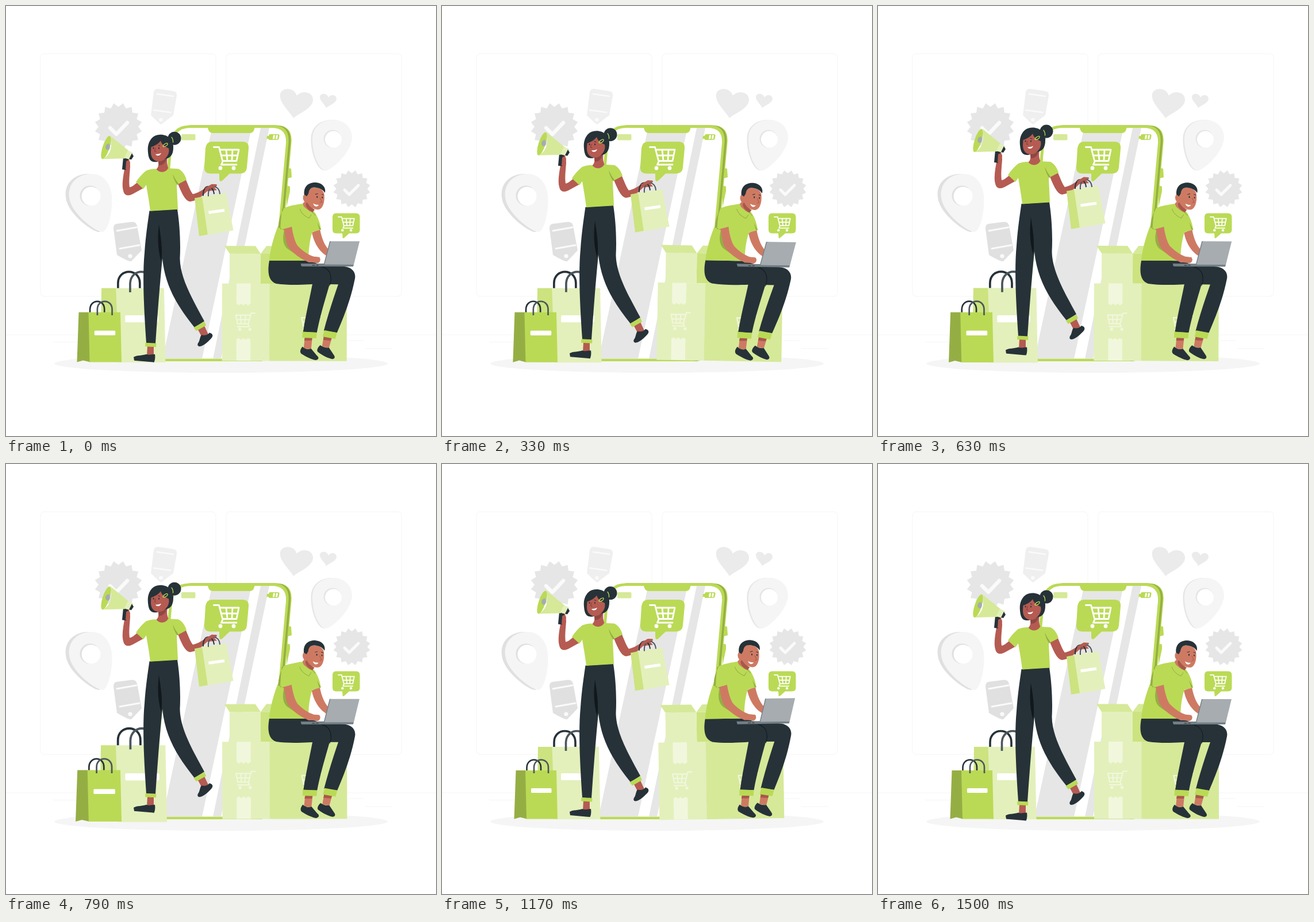
An HTML page for the animation above (1540 ms loop, 748 px wide and 748 px high).

```html
<!DOCTYPE html>
<html lang="en">
<head>
<meta charset="utf-8">
<title>Shopping online</title>
<style>
  html, body { margin: 0; width: 100%; height: 100%; overflow: hidden; background: #fff; }
  svg { display: block; width: 100vw; height: 100vh; }
  .lime { fill: #bada55; } .shade { fill: #cce37f; } .mid { fill: #d6e999; } .pale { fill: #e3f0bb; } .olive { fill: #95ae44; }
  .navy { fill: #263238; } .tan { fill: #ce7a63; } .brown { fill: #b55b52; } .white { fill: #fff; }
  .g1 { fill: #e0e0e0; } .g2 { fill: #e6e6e6; } .g3 { fill: #ebebeb; } .g4 { fill: #f5f5f5; }
  .line { fill: none; stroke-linecap: round; stroke-linejoin: round; }
  .butt { fill: none; }
  .dark { stroke: #263238; } .slate { stroke: #4b565c; } .light { stroke: #fafafa; }
</style>
</head>
<body>
<svg viewBox="0 0 748 748">
  <defs>
    <g id="cart">
      <path class="line" stroke-width="2.800" d="M1.500 2H10.500L17 27 14.500 32.500H41M12.500 6.500H45L41 26H17M23 7L25 25M34 7L33 25M15 16.500H43"/>
      <g stroke="none"><circle cx="13" cy="38.500" r="3.400"/><circle cx="36" cy="38.500" r="3.400"/></g>
    </g>
    <path id="pinLeft" d="M147 292C170 291 184 310 184.500 335C185 362 177 392 168 393C158 394 113 362 110 333C107 308 125 293 147 292Z"/>
    <path id="pinRight" d="M567 198C588 197 602 211 602 229C601 254 568 285 557 286C545 287 533 258 533 234C532 212 547 199 567 198Z"/>
    <path id="phoneBody" d="M318 207.500H465Q494 207.500 491.500 238L460 588Q456 618 436 618H276Q250 618 252 590L284 242Q288 208 318 207.500Z"/>
  </defs>

  <!-- room -->
  <g fill="none" stroke="#f5f5f5">
    <rect x="60" y="83" width="305" height="422" rx="7"/>
    <rect x="383" y="83" width="305" height="422" rx="7"/>
    <path d="M0 572H748M82 584.500H128M594 582H622M624 596H672"/>
  </g>

  <!-- floating icons -->
  <path class="g2" id="badgeLeft"/>
  <path class="line light" stroke-width="6.500" d="M181 212L192 223 211 203"/>
  <path class="g2" id="badgeRight"/>
  <path class="line light" stroke-width="5" d="M589 320L597 328 613 312"/>

  <path fill="#efefef" d="M264 144L291 148Q298 149 297 156L291 190 270 206Q268 206 252 190L257 150Q258 144 264 144Z"/>
  <path class="line light" stroke-width="2.500" d="M263 153L291 157M257 181L286 185"/>
  <circle cx="269.500" cy="198" r="3.300" fill="#fafafa"/>
  <path class="g1" d="M192 379L219 375.500Q226 375 228 382L236 425 218 444Q215 446 193 433L187 387Q187 380 192 379Z"/>
  <path class="line light" stroke-width="3" d="M193 391L227 385M198 422L232 416"/>
  <circle cx="216" cy="435" r="3.600" fill="#fafafa"/>

  <use href="#pinLeft" class="g1" x="-6"/><use href="#pinLeft" class="g4"/>
  <circle class="g1" cx="146" cy="330" r="17.500"/><circle class="white" cx="148" cy="331" r="16.500"/>
  <use href="#pinRight" class="g2" x="-2.500"/><use href="#pinRight" class="g4"/>
  <circle class="g2" cx="568" cy="231" r="15.500"/><circle class="white" cx="569.500" cy="232" r="14.500"/>
  <path class="g3" d="M500 195C495 185 474 168 477 153C480 142 500 140 506 156C514 146 533 149 534 162C535 178 510 186 500 195Z"/>
  <path class="g3" d="M557 177.500C555 171 545 165 546 157C548 151 558 151 561 159C565 153 574 154 575 161C575 169 563 172 557 177.500Z"/>

  <ellipse class="g4" cx="374" cy="622" rx="290" ry="16"/>

  <!-- phone -->
  <path class="lime" d="M488 281L496 283 497 298 489 300ZM488 312L494 314 494 322 488 350Z"/>
  <use href="#phoneBody" class="lime" x="5"/><use href="#phoneBody" class="olive" x="3.500"/><use href="#phoneBody" class="lime"/>
  <path class="white" d="M319 212H462Q489 212 487 239L456 586Q453 613.500 435 613.500H278Q255 613 257 590L289 243Q292 213 319 212Z"/>
  <path class="g2" d="M358.500 212H427L341 613.500H272.500ZM443 212H458L374 613.500H360Z"/>
  <path class="lime" d="M350 208H433C432 217 430 221 424 221H360C353 221 352 216 350 208Z"/>
  <rect class="mid" x="305" y="223" width="24.500" height="10.500" rx="2"/>
  <path class="lime" d="M454 226h3q0-3 3-3h13q3 0 2.500 3l-1 5q-.5 2-3 2h-13q-2 0-2-2h-3z"/>
  <path class="white" d="M465 224.500h3l-1 7h-3zM470 224.500h3l-1 7h-3z"/>
  <path class="lime" d="M358 236H412Q423 236 422 248L419 281Q418 291.500 407 291.500H389L376 304Q371 307 371 300L371 291.500H355Q344 291 345 280L347 247Q349 236 358 236Z"/>
  <use href="#cart" transform="translate(360 243.500)" fill="#fff" stroke="#fff"/>

  <!-- shopping bags -->
  <g id="bags">
    <path class="shade" d="M167 492H192L202 617H165Z"/>
    <path class="pale" d="M191.500 492H273L275.500 618H196Z"/>
    <rect class="white" x="207" y="538" width="56" height="12" rx="2"/>
    <path class="butt dark" stroke-width="3.600" d="M195 492V484C195 458 232 458 232 484V492"/>
    <path class="butt slate" stroke-width="3.600" d="M215.500 499V484C217 458 252 458 252 484V499"/>
    <path class="olive" d="M128.500 533H146L148 617.500 136 614.500 125.500 617.500Z"/>
    <path class="lime" d="M145 533H199L201 617.500H147Z"/>
    <rect class="white" x="155" y="564" width="35.500" height="8" rx="1.500"/>
    <path class="butt dark" stroke-width="2.600" d="M147.500 533V528C148 510 172 510 172 528V533"/>
    <path class="butt slate" stroke-width="2.600" d="M160 538V528C160 510 185 510 185 528V538"/>
  </g>

  <!-- woman -->
  <g id="woman">
    <path class="brown" d="M246 592H257V610H245ZM334 564L345 557 352 572 342 579Z"/>
    <path class="navy" d="M222 611.500C227 608 238 609 244 606.500C250 609 255 606 259 606.500C260 612 259 618 257.500 620.500L223 617.500ZM354 569C361 571 361 576 355 581C349 587 342 593 336 593C332 592 333 588 335.500 585C338 579 338 573 341 573Q349 575 354 569Z"/>
    <path class="navy" d="M251 357L298 354C302 380 304 410 302.500 440C303 470 318 500 345 549L328 560C300 525 277 490 272 440C268 480 264 530 260 588L244 587C240 530 237 470 241 430C243 400 247 375 249.500 357Z"/>
    <path d="M266 381C264 400 263 420 270 446C273 425 269 400 266 381Z" fill="#10181c"/>
    <path class="lime" d="M242.500 586.500L261.500 587.500 261 594 242 593ZM326.500 560L345 549.500 348 556.500 331 566Z"/>

    <path class="brown" d="M228 308C222 313 218 316 215 316C213.500 305 215 295 216 280L214 265 207 268 207 280C204 295 201 312 204 322C206 332 214 331 220 328L240 317Z"/>
    <path class="brown" d="M264 268L282 261C279 270 280 278 283 284C280 293 267 293 261 285C266 281 266 275 264 268Z"/>
    <path d="M265 271Q275 270 279 264L278 270Q274 278 266 278Z" fill="#8f4741"/>
    <path class="brown" d="M299 310L313 303C318 315 322 325 325 328C335 326 342 320 350 316L358 311 366 311C368 313 366 315 362 316L367 321 350 323C340 333 330 340 320 341C311 340 304 322 299 310Z"/>
    <path class="lime" d="M244 287C252 284 258 284 261 284C267 292 278 291 282 283L300 284C308 288 312 296 314 303L297 312 299 354.500 251 357.500C249 340 246 325 244 312L239 319 226 307Q234 295 244 287Z"/>
    <path class="olive" d="M290 293Q292 304 298 312L300 310Q294 302 290 293Z"/>

    <path class="navy" d="M204 264L213 267 209 286 202 285Z"/>
    <ellipse class="lime" cx="174" cy="247" rx="6" ry="21" transform="rotate(18 174 247)"/>
    <path class="mid" d="M182 227Q185 241 181 253Q177 263 168 267L207 266 214 253Z"/>
    <path d="M179 240Q173 241 173 247Q174 252 179 251Q183 245 179 240Z" fill="#a6acaf"/>
    <path class="pale" d="M212 252L221 256 216 268 206 265Z"/>
    <path class="navy" d="M219 257L222 262 218 268 214 267Z"/>
    <path class="brown" d="M209 271Q214 267 216 273L215 284 208 285Z"/>

    <circle class="navy" cx="293" cy="231" r="11.500"/>
    <path class="navy" d="M247 255C245 238 254 224.500 268 224.500C282 224 292 234 291 247C291 258 287 264 280 266L262 272C252 273 248 268 247 255Z"/>
    <path class="brown" d="M252.500 246C259 244 266 240 269 235C271 242 277 246 283 248C285 256 281 262 278 265C274 270 269 271 264 271C257 270 252 265 252 255Z"/>
    <path class="line" stroke="#bada55" stroke-width="1.300" d="M273 245C273 242 280 238 281 240C282 243 275 247 273 245ZM288 229Q291 233 290.500 238"/>
    <path class="line dark" d="M255 244L257 243M265 243L268 244"/>
    <path class="line" stroke="#7e3b37" d="M260 248L258.500 253.500 261 254"/>
    <ellipse class="navy" cx="256.500" cy="248" rx="1" ry="1.600"/><ellipse class="navy" cx="266" cy="248" rx="1" ry="1.600"/>
    <path class="white" d="M260 258.500Q265 259 270 256.500Q268 261.500 263.500 261Q261 260.500 260 258.500Z"/>

    <path class="butt dark" stroke-width="2" d="M343 331C342 310 360 310 362 328"/>
    <path class="shade" d="M328 335L343 332 353 398 336 401Z"/>
    <path class="pale" d="M341 332L383 326 395.500 391 351 399Z"/>
    <path class="butt" stroke="#fff" stroke-width="5" d="M352.500 360L380 356"/>
    <path class="butt slate" stroke-width="2" d="M352 332C350 310 371 310 372 328"/>
    <path class="brown" d="M345 318L358 310.500 366 311Q368 313 362 315L354 319Z"/>
  </g>

  <!-- man on boxes -->
  <g id="man">
    <path class="shade" d="M443 431H490V483H443Z"/>
    <path class="mid" d="M443 431L453 417.500H480V431Z"/>
    <path class="pale" d="M389 431H443V483H389ZM376 483H459V617.500H376Z"/>
    <path class="mid" d="M380 417.500H434L443 431H389ZM458.500 483H593V617.500H458.500Z"/>
    <path fill="#f1f7dd" d="M401 483H425.500V518L421 521 417 518 413 521 409 518 405 521 401 518ZM401 617V580L405 578 409 581 413 578 417 581 421 578 425.500 580V617Z"/>
    <g fill="#f1f7dd" stroke="#f1f7dd">
      <use href="#cart" transform="translate(434.500 533) scale(-.77 .77)"/>
      <use href="#cart" transform="translate(549 537) scale(-.77 .77)"/>
    </g>

    <path class="tan" d="M520 577H533L531 597 518 596ZM553 575L567 577 562 595 550 592Z"/>
    <path d="M520 577H533L532 582 519 582ZM553 575L567 577 565 582 552 581Z" fill="#a8584a"/>
    <path class="navy" d="M516 592.500C512 597 511 602 514 605C522 610 532 615 539 616C545 615 545 611 541 608L531 596C526 598 520 597 516 592.500ZM547 590C542 594 540 600 543 602C551 608 561 613 568 614C573 613 573 610 570 606L562 594C556 595 551 593 547 590Z"/>
    <path class="navy" d="M530 447L590 453C603 455 609 464 607 474C600 510 588 540 576 568L553 565C560 538 569 510 578 484L558 484Z"/>
    <path class="navy" d="M458 443C455 460 455 478 470 483C490 486 515 485 533 484C528 510 521 540 517 567L541 568C546 540 557 505 564 480C567 462 560 456 530 443Z"/>
    <path class="line" stroke="#11191d" d="M550 454Q567 458 565 479L563 486"/>
    <path class="lime" d="M516 566.500L541 568 540 578 515.500 577ZM554 564L576 568 573 579 551 575Z"/>

    <path class="tan" d="M532 394L546 388C549 405 555 418 562 424L559 435C548 430 536 415 532 394Z"/>
    <path class="lime" d="M483 352C492 347 505 346 514 344L536 358C542 366 546 376 548 389L533 393C530 400 525 425 527 443H458C459 425 466 400 474 380Z"/>
    <path class="olive" d="M480 353L477 388 484 390C480 405 482 418 492 424L516 440 500 415 497 386 474 386Q473 370 483 352ZM541 376L545 389 548 389Z"/>
    <path class="lime" d="M483 352C478 362 477 377 479 389L499 384C500 370 494 350 483 352Z"/>
    <path class="tan" d="M483 388L497 384C499 398 503 412 508 418C518 428 528 434 536 436L545 437C549 442 545 448 540 447L525 445C512 440 493 426 489 415C486 405 485 395 483 388Z"/>

    <path class="tan" d="M521 338L534 350 534 362 514 346Z"/>
    <path d="M523 340Q528 351 537 354L533 359Q522 353 521 345Z" fill="#a8584a"/>
    <path class="lime" d="M516 344Q518 354 533 359L537 363 529 369Q512 362 509 349Z"/>
    <path class="line" stroke="#95ae44" d="M511 353Q514 363 527 369L531 363M533 359L538 364"/>
    <path class="tan" d="M524 320C530 313 550 314 553 326C555 338 552 352 544 354C535 355 527 348 525 342C518 343 515 335 517 330C519 326 523 327 524 328Z"/>
    <path class="navy" d="M518.500 328C517 313 527 306.500 539 307C551 308 557 317 554.500 325C551 319 545 317 540 316C531 314 527 318 526 326L523 331Z"/>
    <path class="line dark" d="M538 327.500L542 326.500M549 327.500L552 328.500"/>
    <ellipse class="navy" cx="541" cy="332" rx="1.100" ry="1.700"/><ellipse class="navy" cx="550" cy="333" rx="1" ry="1.600"/>
    <path class="line" stroke="#a8584a" d="M546 334L549.500 341 546 342"/>
    <path class="white" d="M534 343.500Q539 346 544 346Q542 349.500 538 348.500Q535 347 534 343.500Z"/>

    <path fill="#737f86" d="M512.500 448H553L563 409 566 409 556 449 605 449 604 453H514Z"/>
    <path fill="#a6acaf" d="M564.500 409H615L605 449.500H554Z"/>
    <path class="line" stroke="#3d494f" stroke-width="1.500" d="M533 451H537M540 451H543"/>
    <path class="tan" d="M520 441L536 436 545 437Q548 441 544 445.500L526 446Z"/>
  </g>

  <path class="lime" d="M574 360.500H609Q615.500 360.500 615.500 367V389Q615.500 395.500 609 395.500H597L588 403.500Q585 405 585.500 401L585 395.500H574Q568 395.500 568 389V367Q568 360.500 574 360.500Z"/>
  <use href="#cart" transform="translate(577 365.500) scale(.64)" fill="#fff" stroke="#fff"/>
</svg>
<script>
const el = id => document.getElementById(id);
const LOOP = 1540, FRAMES = 37, STEP = 1000 / 24;

function badge(id, cx, cy, outer, inner, spikes = 16) {
  const points = Array.from({ length: spikes * 2 }, (_, i) => {
    const angle = (i + 1) * Math.PI / spikes - Math.PI / 2, r = i % 2 ? inner : outer;
    return `${cx + r * Math.cos(angle)} ${cy + r * Math.sin(angle)}`;
  });
  el(id).setAttribute('d', `M${points.join('L')}Z`);
}
badge('badgeLeft', 195.500, 210, 41.500, 34.500);
badge('badgeRight', 601.500, 318, 32.500, 27);

// Linear interpolation through [position, value] pairs.
function track(keys, u) {
  const i = Math.max(1, keys.findIndex(key => key[0] >= u));
  const [a, from] = keys[i - 1], [b, to] = keys[i];
  return from + (to - from) * (u - a) / (b - a);
}
const float = [[0, 0], [.5, -15], [1, 0]];
const sway = [[0, 0], [.25, 1], [.75, -1], [1, 0]];
const beat = [[0, 1], [.1, 1.1], [.3, 1], [.4, 1], [.5, 1.1], [.6, 1], [1, 1]];

function draw(now) {
  const index = Math.floor((now % LOOP + 5) / STEP);
  const u = Math.min(1, (index + 1) / FRAMES);
  el('woman').setAttribute('transform', `translate(0 ${track(float, u)})`);
  el('man').setAttribute('transform', `rotate(${track(sway, u)} 495.500 462)`);
  el('bags').setAttribute('transform', `translate(200.500 540) scale(${track(beat, u)}) translate(-200.500 -540)`);
  requestAnimationFrame(() => draw(performance.now()));
}
draw(performance.now());
</script>
</body>
</html>
```
